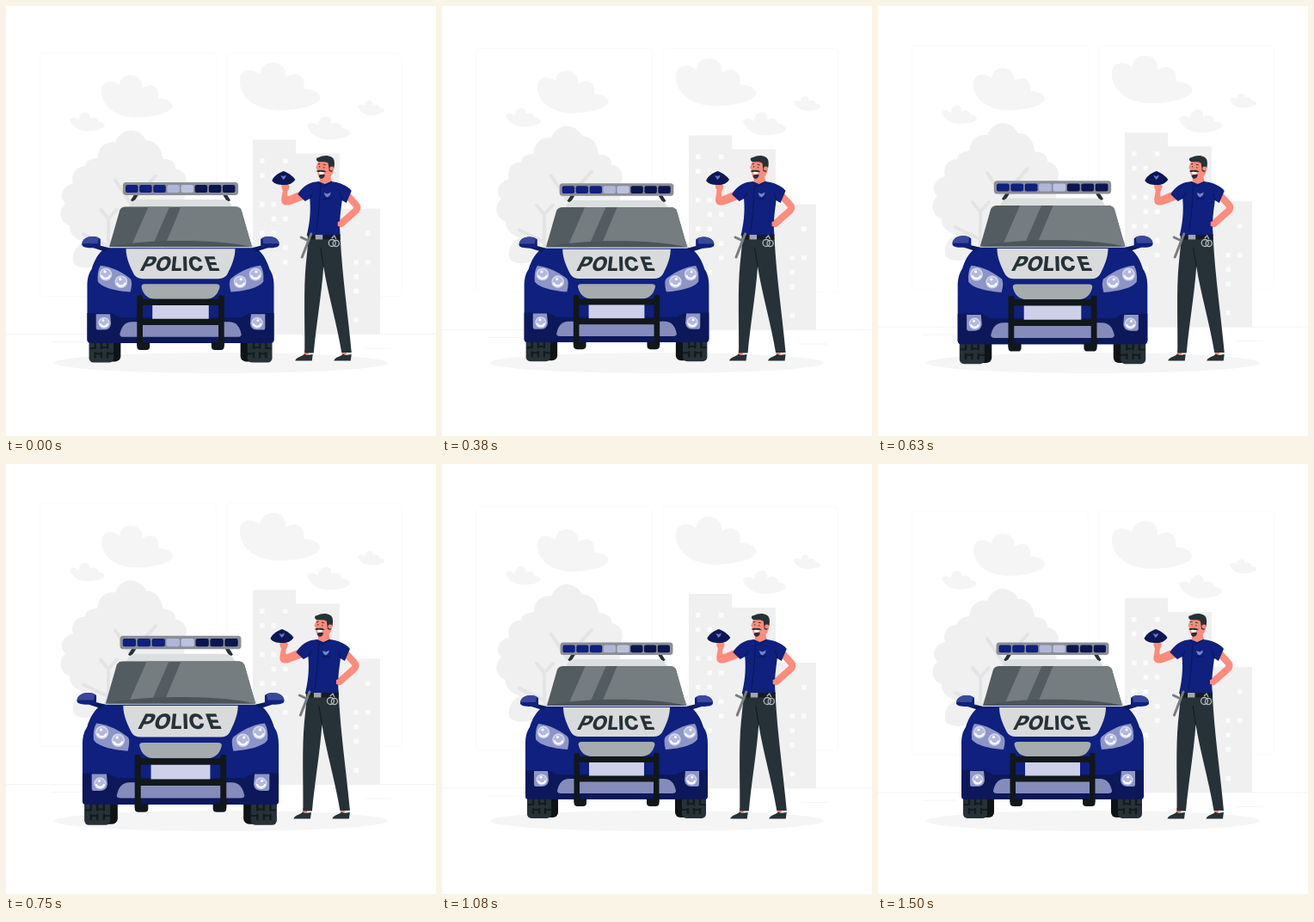
An HTML page that plays this animation: 500 by 500 pixels, repeating every 1540 ms.

```html
<!DOCTYPE html>
<html lang="en">
<head>
<meta charset="utf-8">
<title>Police car and officer</title>
<style>
html, body { margin: 0; width: 100%; height: 100%; overflow: hidden; background: #fff; }
svg { display: block; width: 100vw; height: 100vh; }
text { font: 800 22.5px Inter, "Liberation Sans", sans-serif; text-anchor: middle; fill: #263238; }
</style>
</head>
<body>
<svg viewBox="0 0 500 500">
  <defs>
    <clipPath id="glass"><path d="M141 235H265Q270 235 272 239L284 281H122L134 239Q136 235 141 235Z"/></clipPath>
    <path id="bigCloud" d="M111 98C112 87 124 86 132 93C133 82 141 81 146 81C155 81 160 90 158 96C166 90 179 91 177 108C185 107 194 112 194 117C190 127 165 130 150 130C125 129 110 115 111 98Z"/>
    <path id="cloud" d="M350 139C354 135 360 136 363 140C363 132 368 129 373 129C378 130 379 135 378 138C383 134 391 137 391 143C396 142 400 146 400 149C396 155 380 156 373 156C361 155 352 148 350 139Z"/>
    <g id="bulb">
      <circle r="7.2" fill="#d3d6ec"/>
      <circle r="5.6" fill="#b3b8dc"/>
      <path d="M-4.800 1A5 5 0 0 0 4.800 1" fill="none" stroke="#fff" stroke-width="2"/>
      <circle cx="-1" cy="-3" r="1.600" fill="#fff"/>
    </g>
    <g id="wheel">
      <rect x="112" y="380" width="23" height="31" rx="6" fill="#0e1316"/>
      <rect x="99" y="380" width="28" height="32" rx="5" fill="#263238"/>
      <path d="M106 390V410M113 390V410M120 390V410" stroke="#141b1f" stroke-width="2.4" stroke-dasharray="7 3"/>
      <path d="M100 396H106M107 402H113M114 395H120M121 402H127" stroke="#141b1f" stroke-width="2"/>
    </g>
    <g id="side">
      <path d="M106 278L122 282L117 286L104 282Z" fill="#0c1a5c"/>
      <path d="M91 278C91 272 97 269 103 269Q109 269 112 272V282H103C96 282 91 281 91 278Z" fill="#0f207e"/>
      <path d="M91 277C92 271 98 269 103 269Q109 269 110 271L109 277Z" fill="#3a489b"/>
      <path d="M112 302C125 303 139 311 146 317Q149 320 146 332C130 331 113 327 109 320Q108 309 112 302Z" fill="#8d94c7"/>
      <use href="#bulb" x="118" y="312"/>
      <use href="#bulb" x="135.500" y="320.500"/>
      <path d="M107 357H123L124 368Q123 375 116 375H109Q107 375 107 372Z" fill="#8d94c7"/>
      <use href="#bulb" transform="translate(116 367) scale(.9)"/>
    </g>
    <g id="guard" fill="#11171a">
      <rect x="153.500" y="336" width="6.500" height="58" rx="1.500"/>
      <path d="M153.500 389H168V394Q168 398 164 398H157.500Q153.500 398 153.500 394Z"/>
    </g>
  </defs>

  <g id="backdrop">
    <g fill="none" stroke="#fafafa">
      <rect x="39.500" y="55" width="205" height="283" rx="4"/>
      <rect x="256.500" y="55" width="204" height="283" rx="4"/>
      <path d="M0 382H500M417 398.500H448M52 391H90" stroke="#f4f4f4"/>
    </g>
    <g fill="#f5f5f5">
      <use href="#bigCloud"/>
      <use href="#bigCloud" transform="translate(146.500 -25) scale(1.13)"/>
      <use href="#cloud"/>
      <use href="#cloud" transform="translate(-213 21) scale(.82 .8)"/>
      <use href="#cloud" transform="translate(192 30.500) scale(.62)"/>
    </g>
    <path d="M145 145C154 145 160 151 163 157C171 156 181 163 182 178C192 178 198 183 197 190C206 191 212 199 209 210L200 300H110C100 306 86 307 79 300C75 289 82 278 91 275C81 272 73 265 74 256C62 252 60 237 69 230C61 222 66 209 78 207C75 194 82 187 92 187C92 181 98 178 107 177C106 165 117 157 127 159C130 151 137 145 145 145Z" fill="#f0f0f0"/>
    <path d="M119 375V248L110 237M119 248L129 237M119 280L90 266M174 198L145 230L127 203" fill="none" stroke="#e4e4e4" stroke-width="4" stroke-linecap="round"/>
    <path d="M287 156H337V172H388V236H435V382H287Z" fill="#f0f0f0"/>
    <g id="windows" fill="#fbfbfb"></g>
  </g>

  <ellipse cx="250" cy="415" rx="194" ry="12" fill="#f5f5f5"/>

  <g id="car">
    <use href="#wheel"/>
    <use href="#wheel" transform="matrix(-1 0 0 1 406 0)"/>
    <path d="M153 221L148 229M253 221L258 229" stroke="#263238" stroke-width="4"/>
    <rect x="137.500" y="207.500" width="131" height="14.500" rx="3.500" fill="#8b8e96"/>
    <g id="lights"></g>
    <path d="M155 227H251Q257 227 260 232L288 284H118L146 232Q149 227 155 227Z" fill="#dcdfdf"/>
    <g clip-path="url(#glass)">
      <path d="M120 234H286V282H120Z" fill="#535c60"/>
      <path d="M167 234H191L170 282H146ZM204 234H290V282H184Z" fill="#757d80"/>
      <path d="M120 282C150 271 256 271 286 282Z" fill="#4b5458"/>
    </g>
    <path d="M118 282H288C296 287 301 296 304 306C308 312 309 318 309 326V386Q309 390 305 390H101Q97 390 97 386V326C97 318 98 312 102 306C105 296 110 287 118 282Z" fill="#0f207e"/>
    <path d="M97 356H124L134 361H272L282 356H309V386Q309 390 305 390H101Q97 390 97 386Z" fill="#0c185a"/>
    <path d="M141 283H265C265 294 260 304 256 312Q253 317 246 317H160Q153 317 150 312C146 304 141 294 141 283Z" fill="#d9dadb"/>
    <g id="sign"></g>
    <path d="M163 323H243Q249 323 247 328C245 335 240 340 232 340H174C166 340 161 335 159 328Q157 323 163 323Z" fill="#a6abae"/>
    <rect x="171" y="346" width="64" height="17" fill="#cdd0e8"/>
    <path d="M134 380C136 371 140 366 148 366H258C266 366 270 371 272 380Q272 383 268 383H138Q134 383 134 380Z" fill="#858cbb"/>
    <use href="#side"/>
    <use href="#side" transform="matrix(-1 0 0 1 406 0)"/>
    <use href="#guard"/>
    <use href="#guard" transform="matrix(-1 0 0 1 406 0)"/>
    <path d="M155 340H251V347H155ZM155 362.500H251V369.500H155Z" fill="#11171a"/>
  </g>

  <g id="officer">
    <path d="M347 400H352V406H347ZM391 400H396V406H391Z" fill="#ff8b7b"/>
    <g fill="#263238">
      <path id="shoe" d="M357 405L350 406L347 404.500C345 408 338 407.500 336.500 412.500H356Z"/>
      <use href="#shoe" x="45"/>
      <path d="M352 270H389C391 312 398 360 402 403H390.500C385 370 374 332 369.500 303C367 337 361 370 358 403.500H347.500C348 370 346 330 349 300Z"/>
    </g>
    <path d="M369.500 303L366 281" stroke="#11181b"/>
    <path d="M320 209Q325 205 330 209L329 213C327 216 327 219 328 221.500L346 214L347 225L331 231C323 233 320 230 320.500 224L322 215Z" fill="#ff8b7b"/>
    <path d="M397 220L407 231Q410 234 407 238L390 253" fill="none" stroke="#ff8b7b" stroke-width="8" stroke-linejoin="round" stroke-linecap="round"/>
    <path d="M309.500 203C312 197 318 194 323 192C328 194 334 197.500 336.500 202C333 207 328 208.500 323 208C317 208 312 207 309.500 203Z" fill="#0c1757"/>
    <path d="M319.500 197L323 198L326 196.500L325 200L322.500 202Z" fill="#6975bd"/>

    <path d="M365 194H377L379 206Q372 210 365 206Z" fill="#ff8b7b"/>
    <path d="M357 205C349 207 343 213 339.500 219L348 227L353.500 224C355 240 353 254 350 267H389C387 250 390 236 391 226L396 229L402 215C398 209 388 205 378 204L371 207L364 204Z" fill="#0f207e"/>
    <path d="M353.500 224L357 217M391 226L389 217M366 208C365 224 364 243 361 262M363 204L369 210L379 204" fill="none" stroke="#0a1555"/>
    <path d="M370 217L374 218.500L378 216.500L377 220L374 222.500L371.500 221Z" fill="#7984c4"/>
    <path d="M369 224H378" stroke="#0a1555"/>
    <path d="M386 251L392 249L396 253L390 257L386 256Z" fill="#ff8b7b"/>

    <path d="M364 179L380 180L381 192C379 199 374 202 369 202C364 201 362 196 362.500 191L360.500 188Z" fill="#ff8b7b"/>
    <path d="M363 181C360 179 361 176 364 176C371 172 382 174 382 181Q383 188 379 193L376 192L375 183C371 180 367 182 363 181Z" fill="#263238"/>
    <circle cx="379" cy="189" r="2.500" fill="#ff8b7b"/>
    <path d="M364 197Q367 195 371 196Q371 200 367 201Q364 200 364 197Z" fill="#263238"/>
    <path d="M363.500 193L371 192.500Q370 196 366 196Q364 195.500 363.500 193Z" fill="#fff"/>
    <path d="M361 192Q364 190 366 191Q370 190 373 193Q368 193.500 366 192.500Q363 194 361 192Z" fill="#263238"/>
    <path d="M363 184L365.500 183.500M369 184L372 185M365 186V187.500M370 187V188.500" stroke="#263238"/>

    <path d="M351 266H389V271.500H351Z" fill="#151d20"/>
    <rect x="360" y="266" width="8.500" height="5.500" fill="#a2a6a8"/>
    <path d="M355 265L344.500 292M343.500 269L352 273" stroke="#777c7e" stroke-width="3" stroke-linecap="round"/>
    <g fill="none" stroke="#b4b9bb" stroke-width="1.300">
      <circle cx="379.500" cy="275.500" r="4"/>
      <circle cx="384" cy="276" r="3.600"/>
      <path d="M379 270L382 267L384 271"/>
    </g>
  </g>
</svg>
<script>
const $ = id => document.getElementById(id);
const LOOP = 1540, STEP = 1000 / 24, CYCLE = 1500, LEAD = 36;

// Window columns per row, starting at the roof
const rows = ["02", "01", "2", "01", "12", "01", "2", "02", "1"];
const windows = (x, y, list) => list.flatMap((cols, r) =>
  [...cols].map(c => `<rect x="${x + c * 13.5}" y="${y + r * 16.8}" width="5.500" height="5.500"/>`)).join("");
$("windows").innerHTML = windows(295, 178, rows) +
  windows(404.5, 262, ["1", "", "01", "0", "0", "", "0"]);

const lamps = ["#0f207e", "#0f207e", "#0f207e", "#b0b6d8", "#bcc1de", "#0b1650", "#0b1650", "#0b1650"];
$("lights").innerHTML = lamps.map((color, i) =>
  `<rect x="${140.5 + i * 15.75}" y="210.500" width="14.200" height="8.700" rx="2" fill="${color}"/>`).join("");

const letters = [["P", 163, -27], ["O", 181.5, -16], ["L", 198, -6], ["I", 208.5, 2], ["C", 221.5, 10], ["E", 241.5, 20]];
$("sign").innerHTML = letters.map(([ch, x, skew]) =>
  `<text transform="translate(${x} 308.500) skewX(${skew})">${ch}</text>`).join("");

// Piecewise linear track of [progress, value] keys
function track(keys, u) {
  const i = Math.max(1, keys.findIndex(([k]) => k >= u));
  const [[a, from], [b, to]] = [keys[i - 1], keys[i]];
  return from + (to - from) * (u - a) / (b - a);
}
const float = [[0, 0], [.5, -10], [1, 0]];
const beat = [[0, 1], [.1, 1.1], [.3, 1], [.4, 1], [.5, 1.1], [.6, 1], [1, 1]];
const shake = [0, -1, 2, -4, 4, -4, 4, -4, 2, -1, 0].map((x, i) => [i / 10, x]);

function draw() {
  const t = Math.floor((performance.now() % LOOP + 4) / STEP) * STEP;
  const u = Math.min(1, (t + LEAD) / CYCLE);
  $("backdrop").setAttribute("transform", `translate(0 ${track(float, u)})`);
  $("car").setAttribute("transform", `translate(203 310) scale(${track(beat, u)}) translate(-203 -310)`);
  $("officer").setAttribute("transform", `translate(${track(shake, u)} 0)`);
  requestAnimationFrame(draw);
}
draw();
</script>
</body>
</html>
```
